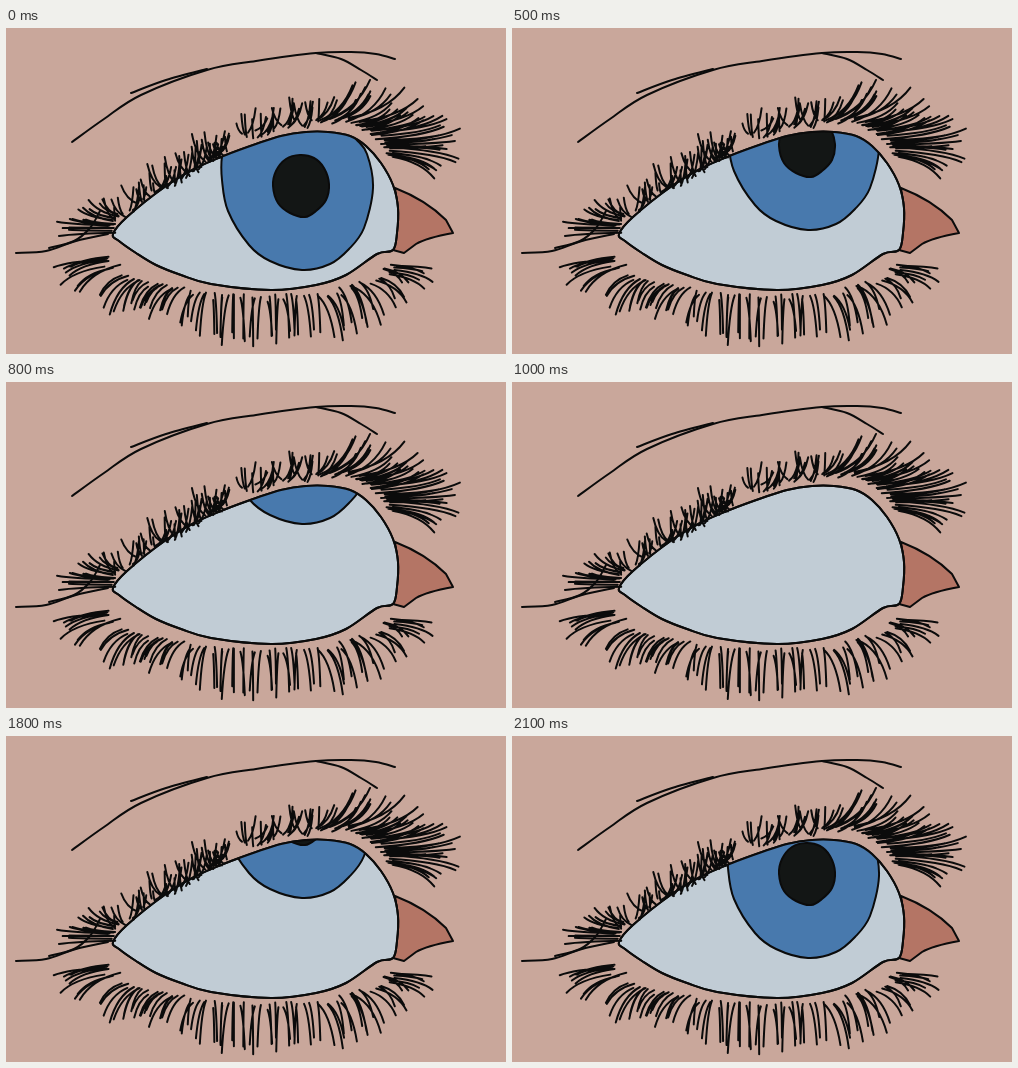
An HTML page with a canvas that plays this animation: 500x326 px, repeating every 2.2 s.

```html
<!DOCTYPE html>
<html lang="en">
<head>
<meta charset="utf-8">
<title>Rolling eye</title>
<style>
html, body { margin: 0; width: 100%; height: 100%; overflow: hidden; background: #c9a79b; }
canvas { display: block; width: 500px; height: 326px; }
</style>
</head>
<body>
<canvas id="stage" width="500" height="326"></canvas>
<script>
const ctx = document.getElementById('stage').getContext('2d');
const SKIN = '#c9a79b', INK = '#0b0b0b', WHITE = '#c1ccd5';
const BLUE = '#4879ad', BLACK = '#131615', PINK = '#b47565';
const LOOP = 2200, STEP = 100, RISE = 20;

let seed = 7;
function random() {
  seed = (seed * 1664525 + 1013904223) % 4294967296;
  return seed / 4294967296;
}
const jitter = size => (random() * 2 - 1) * size;

// Smooth curve through [x, y] points
function curve(pts, closed) {
  const path = new Path2D(), n = pts.length;
  const at = i => pts[closed ? (i + n) % n : Math.max(0, Math.min(n - 1, i))];
  path.moveTo(...pts[0]);
  for (let i = 0; i < (closed ? n : n - 1); i++) {
    const [a, b, c, d] = [at(i - 1), at(i), at(i + 1), at(i + 2)];
    path.bezierCurveTo(
      b[0] + (c[0] - a[0]) / 6, b[1] + (c[1] - a[1]) / 6,
      c[0] - (d[0] - b[0]) / 6, c[1] - (d[1] - b[1]) / 6, ...c);
  }
  if (closed) path.closePath();
  return path;
}

// Row of lashes blended between key lashes [root x, root y, tip x, tip y].
// Each leaves its root sideways and then bends towards the tip.
function fringe(count, spread, keys) {
  const path = new Path2D();
  for (let i = 0; i < count; i++) {
    const pos = (i + random() * 0.8) / count * (keys.length - 1);
    const k = Math.floor(pos), f = pos - k;
    const [rx, ry, tx, ty] = keys[k].map((v, j) => v + (keys[k + 1][j] - v) * f);
    const x = rx + jitter(4), y = ry + jitter(4);
    const reach = 0.65 + 0.4 * random();
    const dx = (tx - rx) * reach + jitter(spread);
    const dy = (ty - ry) * reach + jitter(spread / 3);
    path.moveTo(x, y);
    path.quadraticCurveTo(x + dx * 0.7, y + dy * 0.25, x + dx, y + dy);
  }
  return path;
}

const eye = curve([
  [107, 206], [121, 189], [160, 158], [190, 140], [220, 127], [250, 116], [275, 108],
  [300, 104], [322, 104], [344, 108], [360, 118], [375, 135], [387, 157], [392, 180],
  [391, 205], [387, 222], [371, 226], [340, 247], [310, 257], [265, 262], [205, 256],
  [175, 247], [150, 237], [130, 225], [113, 213]
], true);

const corner = new Path2D(
  'M389 160Q420 172 440 192L447 205Q420 210 410 216L398 225L387 222Q395 190 389 160Z');

const iris = curve([
  [222, 105], [216, 128], [216, 152], [222, 183], [243, 217], [264, 233], [296, 242],
  [324, 236], [343, 221], [358, 200], [367, 160], [361, 126], [350, 111], [335, 95], [280, 90]
], true);

const pupil = curve([
  [294, 127], [308, 130], [318, 140], [323, 156], [320, 172], [310, 183], [299, 189],
  [284, 185], [272, 175], [267, 158], [270, 143], [280, 131]
], true);

const folds = [
  [[66, 114], [98, 91], [135, 67], [201, 42], [250, 33], [310, 25], [345, 24], [370, 26], [389, 31]],
  [[125, 65], [160, 52], [201, 41]],
  [[310, 25], [335, 31], [355, 42], [371, 52]],
  [[10, 225], [40, 223], [70, 213], [102, 206]],
  [[43, 220], [68, 213], [84, 200], [94, 183]]
].map(pts => curve(pts));

const hair = [
  // upper lid: outer end, short tangle, long sweep
  fringe(14, 6, [[106, 204, 56, 206], [104, 198, 60, 192], [110, 188, 88, 170]]),
  fringe(56, 13, [
    [108, 192, 100, 172], [146, 167, 142, 148], [176, 152, 174, 127],
    [205, 133, 204, 108], [220, 125, 222, 110]
  ]),
  fringe(30, 12, [[236, 110, 243, 92], [262, 104, 262, 80], [290, 97, 292, 74], [318, 94, 328, 66]]),
  fringe(48, 6, [
    [310, 95, 340, 56], [335, 92, 378, 58], [352, 96, 408, 72],
    [366, 103, 430, 84], [376, 112, 444, 100], [384, 121, 456, 128], [388, 129, 436, 152]
  ]),
  // lower lid
  fringe(84, 7, [
    [98, 229, 50, 236], [103, 236, 62, 258], [128, 252, 105, 288], [150, 258, 132, 280],
    [172, 262, 155, 291], [200, 268, 196, 312], [230, 270, 228, 322], [262, 270, 260, 312],
    [292, 268, 296, 312], [328, 266, 346, 315], [352, 256, 376, 292], [380, 244, 410, 262],
    [392, 239, 438, 243]
  ])
];

function shape(path, color) {
  ctx.fillStyle = color;
  ctx.fill(path);
  ctx.stroke(path);
}

// Holds, climbs out of sight in even steps, waits, and comes back down
function lift(time) {
  const step = Math.floor((time % LOOP) / STEP);
  return RISE * Math.min(Math.max(0, step - 3), 7, LOOP / STEP - step);
}

function draw(time) {
  ctx.fillStyle = SKIN;
  ctx.fillRect(0, 0, 500, 326);
  ctx.strokeStyle = INK;
  ctx.lineCap = ctx.lineJoin = 'round';
  ctx.lineWidth = 2;
  shape(corner, PINK);
  shape(eye, WHITE);

  ctx.save();
  ctx.clip(eye);
  ctx.translate(0, -lift(time));
  shape(iris, BLUE);
  shape(pupil, BLACK);
  ctx.restore();

  [eye, ...folds, ...hair].forEach(path => ctx.stroke(path));
}

let start;
function frame(now) {
  start ??= now;
  draw(now - start);
  requestAnimationFrame(frame);
}
draw(0);
requestAnimationFrame(frame);
</script>
</body>
</html>
```
